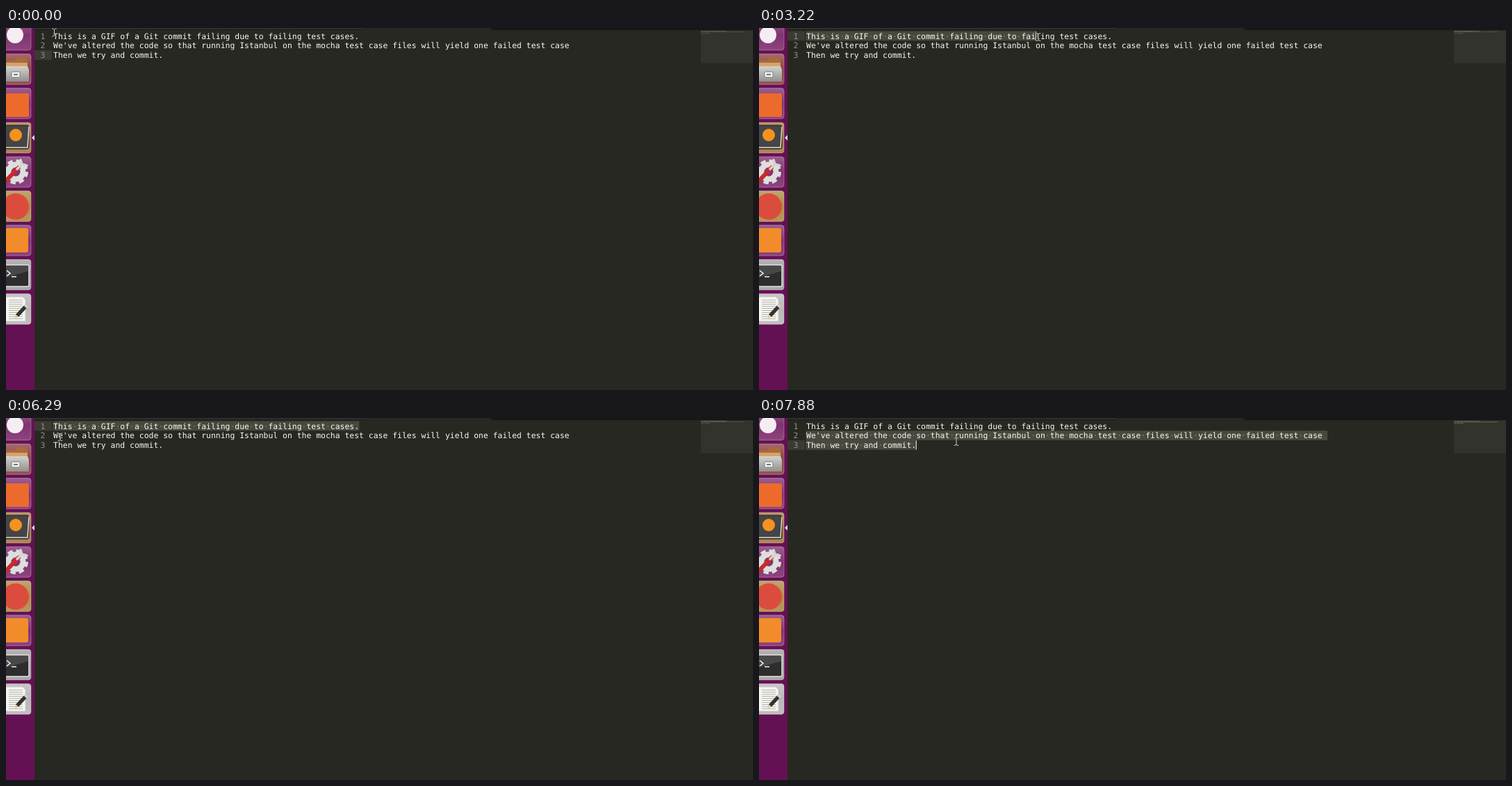
Recreate the animation shown at these times as an HTML page. Size 1075 by 521 pixels, loop 8000 ms.

```html
<!DOCTYPE html>
<html lang="en">
<head>
<meta charset="utf-8">
<title>Editor</title>
<style>
  html, body { margin: 0; width: 100%; height: 100%; overflow: hidden; background: #272822; }
  svg { display: block; width: 100%; height: 100%; }
  text { font: 11.43px "DejaVu Sans Mono", monospace; white-space: pre; text-rendering: geometricPrecision; }
</style>
</head>
<body>
<svg viewBox="0 0 1075 521">
  <defs>
    <linearGradient id="shine" x2="0" y2="1">
      <stop stop-color="#fff" stop-opacity=".24"/>
      <stop offset=".5" stop-color="#fff" stop-opacity=".03"/>
      <stop offset="1" stop-color="#fff" stop-opacity=".12"/>
    </linearGradient>
    <linearGradient id="metal" x2="0" y2="1">
      <stop stop-color="#d2d2d0"/>
      <stop offset="1" stop-color="#91918f"/>
    </linearGradient>
    <path id="beam" d="M-3-5.5Q0-5.5 0-4Q0-5.5 3-5.5M0-4V4M-3 5.5Q0 5.5 0 4Q0 5.5 3 5.5"/>
  </defs>

  <rect width="1075" height="521" fill="#272822"/>
  <path d="M41 0H512L514 2H41Z" fill="#30312c"/>
  <path d="M41 2H514V3H41Z" fill="#1c1d19"/>
  <path d="M700 0H1075V3H697Z" fill="#171814"/>
  <rect x="1000" y="3.5" width="75" height="47" fill="#32332d"/>

  <rect id="gutter" x="41" width="25" height="13.75" fill="#3b3b34"/>
  <g id="numbers" fill="#8f908a"></g>
  <g id="code">
    <g id="marks" fill="#49483e"></g>
    <g id="dots" fill="#85826c"></g>
    <g id="lines" fill="#f8f8f2"></g>
  </g>
  <use href="#code" transform="translate(994.6 4) scale(.0843)"/>
  <rect id="caret" width="1" height="13.2" fill="#f8f8f0"/>

  <g id="launcher">
    <rect width="41" height="521" fill="#641154"/>
    <g id="tiles"></g>

    <circle cx="13" cy="10" r="12" fill="#f4eef2"/>

    <path d="M-2 47H12L15 43H28Q31 43 31 47V60H-2Z" fill="#a96b3d"/>
    <path d="M-2 50H31V57H-2Z" fill="#d8a36a"/>
    <path d="M-2 55H31L33 60V77H-2Z" fill="url(#metal)"/>
    <rect x="8" y="63" width="12" height="8" rx="1.5" fill="#f3f3f1" stroke="#777"/>
    <rect x="11" y="66" width="6" height="2" fill="#777"/>

    <rect x="-4" y="94" width="37" height="34" rx="2" fill="#ec6a2c"/>

    <rect x="-4" y="140" width="37" height="34" rx="3" fill="#454545" stroke="#222"/>
    <path d="M-4 172H31L33 142" fill="none" stroke="#ddd" stroke-width="1.5"/>
    <circle cx="14" cy="154" r="9" fill="#f6921e"/>

    <circle cx="14" cy="207" r="15.5" fill="none" stroke="#dfdfdd" stroke-width="5" stroke-dasharray="7.2 5"/>
    <circle cx="14" cy="207" r="10.5" fill="none" stroke="#dededc" stroke-width="8"/>
    <path d="M-2 222L18 201" stroke="#c92a2a" stroke-width="6" stroke-linecap="round"/>
    <path d="M16 203L23 196L21 190M23 196L30 198" fill="none" stroke="#d4d4d2" stroke-width="3.5" stroke-linecap="round"/>

    <circle cx="14" cy="257" r="19" fill="#dc4c3e"/>

    <rect x="-4" y="288" width="36" height="35" rx="3" fill="#f28c2b"/>

    <rect x="-4" y="341" width="37" height="31" rx="2" fill="#2c2d2c" stroke="#e4e4e2" stroke-width="1.5"/>
    <path d="M-4 342H32V350L-4 360Z" fill="#fff" opacity=".13"/>
    <path d="M1 349L6 353L1 357M8 358H15" fill="none" stroke="#f2f2f2" stroke-width="1.6"/>

    <path d="M-2 387H24L28 391V422H-2Z" fill="#f4f4f0" stroke="#c5c5c0" stroke-width=".7"/>
    <path d="M14 391V420" stroke="#b9b4ae" stroke-width="20" stroke-dasharray="1 2"/>
    <path d="M16 414L28 401" stroke="#333" stroke-width="5.5"/>
    <path d="M27.5 401.5L30 399" stroke="#d8c9c9" stroke-width="6"/>
    <path d="M13 418L14 412.5L18 416Z" fill="#e5c88e"/>

    <path d="M41 154V162L37 158Z" fill="#e6dde4"/>
  </g>

  <g id="mouse" fill="none" stroke-linecap="round">
    <use href="#beam" stroke="#191a16" stroke-width="2.4" opacity=".65"/>
    <use href="#beam" stroke="#d8d8d4"/>
  </g>
</svg>
<script>
const LOOP = 8000, TICK = 134.8, FIRST = 460;
const LEFT = 68, CHAR = 6.881, TOP = 4.6, ROW = 13.75;
const CLICK = 600, DRAG = 1940, RELEASE = 4800, CLICK2 = 6300, DRAG2 = 6790, LAG = 65;
const lines = [
  "This is a GIF of a Git commit failing due to failing test cases.",
  "We've altered the code so that running Istanbul on the mocha test case files will yield one failed test case",
  "Then we try and commit."
];

// Pointer stops: time, x, y
const stops = [
  [0, 69.5, 6.5], [FIRST, 69.5, 6.5], [1140, 166, -4], [1540, 228, 5], [1900, 228, 5],
  [2482, 320.5, 8], [3156, 402, 13], [4280, 506, 11], [RELEASE, 506, 11],
  [5178, 226.5, 12], [6300, 72, 28], [6710, 72, 28], [6930, 142, 22], [7874, 284, 34]
];

const $ = id => document.getElementById(id);
const rowY = row => TOP + row * ROW;

function set(el, attrs) {
  for (const key in attrs) el.setAttribute(key, attrs[key]);
}
function add(parent, tag, attrs, text = "") {
  const el = document.createElementNS("http://www.w3.org/2000/svg", tag);
  set(el, attrs);
  el.textContent = text;
  return $(parent).appendChild(el);
}

const marks = [], dots = [];
lines.forEach((line, row) => {
  const y = rowY(row) + 11.1;
  add("numbers", "text", { x: 49.5, y }, row + 1);
  add("lines", "text", { x: LEFT, y }, line);
  dots.push(add("dots", "text", { x: LEFT, y }));
  marks.push(add("marks", "rect", { x: LEFT - .5, y: rowY(row), height: ROW, rx: 1 }));
});

const plum = "#7d2c6d";
[plum, "#8b3b3d", plum, "#a8753d", plum, "#ad8b40", plum, "#a09b9d", "#b9b5b6"].forEach((fill, i) => {
  const box = { x: -8, y: -12 + i * 49.3, width: 44, height: 44, rx: 4 };
  add("tiles", "rect", { ...box, fill });
  add("tiles", "rect", { ...box, fill: "url(#shine)", stroke: "#fff", "stroke-opacity": .35, "stroke-width": .8 });
});

function pointer(t) {
  const i = stops.findIndex(s => s[0] > t);
  if (i < 0) return stops[stops.length - 1].slice(1);
  const [t0, x0, y0] = stops[i - 1], [t1, x1, y1] = stops[i];
  const k = (t - t0) / (t1 - t0);
  return [x0 + (x1 - x0) * k, y0 + (y1 - y0) * k];
}

// The selection trails the pointer slightly
function dragCol(t, row) {
  const col = Math.ceil((pointer(t - LAG)[0] - LEFT) / CHAR);
  return Math.max(0, Math.min(lines[row].length, col));
}

function editor(t) {
  if (t < CLICK) return { row: 2, col: 23, on: t >= FIRST };
  if (t < DRAG) return { row: 0, col: 0, on: true };
  if (t < CLICK2) return { row: 0, col: dragCol(Math.min(t, RELEASE), 0), from: 0, on: t < RELEASE };
  if (t < DRAG2) return { row: 1, col: 0, on: true };
  const row = pointer(t)[1] > 32 ? 2 : 1;
  return { row, col: dragCol(t, row), from: 1, on: true };
}

function draw(time) {
  const t = time < FIRST ? 0 : FIRST + Math.floor((time - FIRST) / TICK) * TICK;
  const { row, col, from = Infinity, on } = editor(t);
  set($("mouse"), { transform: `translate(${pointer(t)})` });
  set($("gutter"), { y: rowY(row) });
  set($("caret"), { x: LEFT + col * CHAR - .5, y: rowY(row) + .3, opacity: on ? 1 : 0 });
  lines.forEach((line, i) => {
    const n = i < from || i > row ? 0 : i < row ? line.length + 1 : col;
    set(marks[i], { width: n && n * CHAR + .5 });
    dots[i].textContent = line.slice(0, n).replace(/\S/g, "\u00a0").replace(/ /g, "·");
  });
}

const start = performance.now();
function frame() {
  draw((performance.now() - start) % LOOP);
  requestAnimationFrame(frame);
}
frame();
</script>
</body>
</html>
```
